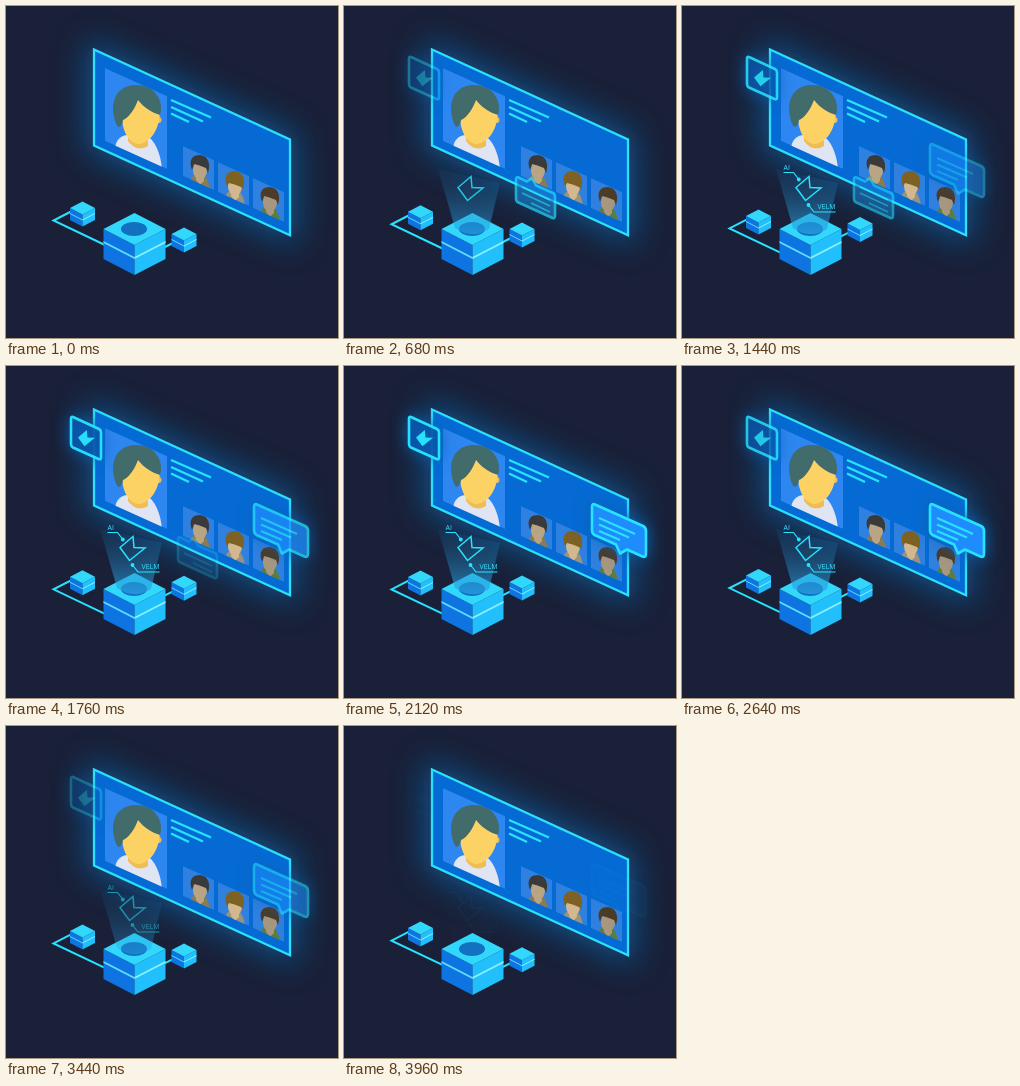
An HTML page that plays this animation: 332x332 px, repeating every 4000 ms.

```html
<!DOCTYPE html>
<html lang="en">
<head>
<meta charset="utf-8">
<title>Isometric profile panel</title>
<style>
html, body { margin: 0; width: 100%; height: 100%; overflow: hidden; background: #192037; }
svg { display: block; width: 100%; height: 100%; }
text { font: 7px "Open Sans", "Noto Sans", sans-serif; fill: #3fe0ff; }
.line { fill: none; stroke: #27e3ff; stroke-width: 1.5; }
.bold { stroke-width: 2; }
.fine { stroke-width: 1.2; }
.edge { stroke: #27e3ff; stroke-width: 2.6; stroke-linejoin: round; }
.glow { filter: drop-shadow(0 0 8px #0a62b4); }
</style>
</head>
<body>
<svg viewBox="0 0 332 332">
  <defs>
    <filter id="blur" x="-40%" y="-40%" width="180%" height="180%"><feGaussianBlur stdDeviation="16"/></filter>
    <linearGradient id="beamFill" x1="0" y1="0" x2="0" y2="1">
      <stop offset="0" stop-color="#1c6ea8" stop-opacity=".1"/>
      <stop offset="1" stop-color="#2aa5e6" stop-opacity=".7"/>
    </linearGradient>
    <path id="mark" d="M13 0L0 11L9.500 24L25 11.500L14 11Z"/>
    <clipPath id="photo"><path d="M99 62L161 90V163L99 135Z"/></clipPath>
    <clipPath id="thumb"><path d="M0 0L31 14V44L0 30Z"/></clipPath>
  </defs>

  <rect width="332" height="332" fill="#192037"/>
  <path d="M87 43L285 133V230L87 140Z" fill="#0a6cb8" stroke="#0a6cb8" stroke-width="14" opacity=".62" filter="url(#blur)"/>
  <path d="M88 43.500L284 133.500V229.300L88 139.500Z" fill="#056ad3" stroke="#2ae2fc" stroke-width="2.300"/>

  <g clip-path="url(#photo)">
    <path d="M99 62L161 90V163L99 135Z" fill="#2e86f0"/>
    <path d="M109 142C110 134 114 130 121 129H140C149 134 155 148 156 164Z" fill="#e0e5f3"/>
    <path d="M122 126H142V140Q131 147 122 135Z" fill="#f0bd55"/>
    <circle cx="152.500" cy="114" r="3" fill="#f0bd55"/>
    <path d="M116 110C116 128 125 138 133 138C145 136 153 124 154 106L131 92Z" fill="#fdd264"/>
    <path d="M112 121C103 106 105 79 130 79C150 79 158 96 154 109C147 107 138 102 132 94C128 105 121 113 117 114Q116 121 112 121Z" fill="#426b6c"/>
  </g>
  <path class="line" style="stroke-width:2.300" d="M165 94L205 111.500M165 101L197 115.500M165 107.500L183 116"/>
  <g id="thumbs"></g>

  <g id="icon" class="glow">
    <path class="edge" d="M67 51L93 63Q95 64 95 66.500V91.500Q95 94 92.500 93L67 81.500Q65 80.500 65 78V53Q65 50 67 51Z" fill="#0b57ad" fill-opacity=".85"/>
    <use href="#mark" transform="translate(72 64) scale(.68)" fill="#27e3ff"/>
  </g>

  <g id="reply">
    <path class="edge" d="M174.500 171.500L183 175.500L188 172L192 179.500L209 187Q211 188 211 191V209.500Q211 213 208.500 212L174.500 196.500Q172 195.500 172 192.500V173.500Q172 170.500 174.500 171.500Z" fill="#1f7fce" fill-opacity=".85"/>
    <path class="line" d="M178 181L206 194M178 187L206 200M187 197L206 206"/>
  </g>

  <g id="message" class="glow">
    <path class="edge" d="M251 138.500L299 160Q302 161.500 302 165V187.500Q302 192 298.500 190.500L283 183.500L276 187.500L272 178.500L250.500 169Q248 167.500 248 164V141.500Q248 137 251 138.500Z" fill="#1f8cfb"/>
    <path class="line bold" d="M255 152L291 168M255 158.500L285 171.500M255 165L276 174"/>
  </g>

  <g id="left">
    <path class="line bold" d="M66 205L47.500 214.500L100 239.500"/>
  </g>
  <g id="right">
    <path class="line bold" d="M155 243L168 236.500"/>
  </g>
  <g id="base"></g>

  <g id="beam">
    <path d="M94 163L156 177L145 223Q128 234 111 222Z" fill="url(#beamFill)"/>
    <use href="#mark" class="line" x="114" y="170.500"/>
    <g id="labels">
      <path class="line fine" d="M101.500 166.500H111.500L116.500 173M126.500 199L132 206H153.500"/>
      <circle cx="116.800" cy="173.500" r="1.900" fill="#27e3ff"/>
      <circle cx="126.500" cy="199" r="1.900" fill="#27e3ff"/>
      <text x="101.500" y="164">AI</text>
      <text x="135.500" y="203">VELM</text>
    </g>
  </g>
</svg>
<script>
const LOOP = 4000;
const $ = id => document.getElementById(id);
const poly = (pts, fill) => `<polygon points="${pts.join(" ")}" fill="${fill}"/>`;

// Isometric box with a pale seam around its sides.
function box(x, y, w, d, h, seam, gap) {
  const side = (dir, from, to, fill) => poly([
    [x + dir * w, y + from], [x, y + d + from], [x, y + d + to], [x + dir * w, y + to]
  ], fill);
  return side(-1, 0, h, "#0d74e2") + side(1, 0, h, "#21bffc") +
    side(-1, seam, seam + gap, "#5fdcff") + side(1, seam, seam + gap, "#8af0ff") +
    poly([[x, y - d], [x + w, y], [x, y + d], [x - w, y]], "#32d8fc");
}

function thumb(x, y, hair, shirt, skin, fringe) {
  return `<g transform="translate(${x} ${y})" clip-path="url(#thumb)">
    <path d="M0 0L31 14V44L0 30Z" fill="#2f80df"/>
    <path d="M7 44V35Q9 29 14 29H21Q26 34 27 44Z" fill="${shirt}"/>
    <path d="M13 28H21V35L17 39L13 34Z" fill="${skin}"/>
    <ellipse cx="17" cy="24" rx="7" ry="10" fill="${skin}"/>
    <path d="M9 24C5 13 10 9 17 9C25 10 28 17 25 27L23 ${fringe + 4}Q16 ${fringe + 1} 11 ${fringe}Z" fill="${hair}"/>
  </g>`;
}

$("thumbs").innerHTML =
  thumb(177, 140, "#3b3a3a", "#8a7c52", "#b9a584", 18) +
  thumb(212, 156, "#7d6224", "#97937f", "#d2b88c", 21) +
  thumb(247, 172, "#4b3b28", "#5b7d42", "#a8977f", 18);
$("left").innerHTML += box(76.5, 202, 12.5, 6.5, 12, 5, 1);
$("right").innerHTML += box(178, 228, 12.5, 6.5, 12, 5, 1);
$("base").innerHTML = box(128.5, 223, 31, 16, 30, 12, 2) +
  '<ellipse cx="128" cy="223" rx="13" ry="7" fill="#1270c0"/>';

const clamp = v => Math.max(0, Math.min(1, v));
const ramp = (t, from, to) => clamp((t - from) / (to - from));
// Rise from a to b, hold until c, fall to d.
const pulse = (t, a, b, c, d) => Math.min(ramp(t, a, b), 1 - ramp(t, c, d));
const fade = (id, v) => $(id).setAttribute("opacity", v.toFixed(3));
const lift = (id, y) => $(id).setAttribute("transform", `translate(0 ${y.toFixed(2)})`);

function draw(t) {
  const sway = Math.sin(Math.PI * t / LOOP) ** 1.3;
  lift("left", 9 * sway);
  lift("right", -12 * sway);
  fade("icon", sway);
  fade("reply", pulse(t, 0, 1000, 1000, 2000));
  fade("message", pulse(t, 1000, 2000, 3000, LOOP));
  fade("beam", pulse(t, 0, 800, 3000, LOOP));
  fade("labels", ramp(t, 900, 1400));
}

function tick(now) {
  draw(now % LOOP);
  requestAnimationFrame(tick);
}
draw(0);
requestAnimationFrame(tick);
</script>
</body>
</html>
```
